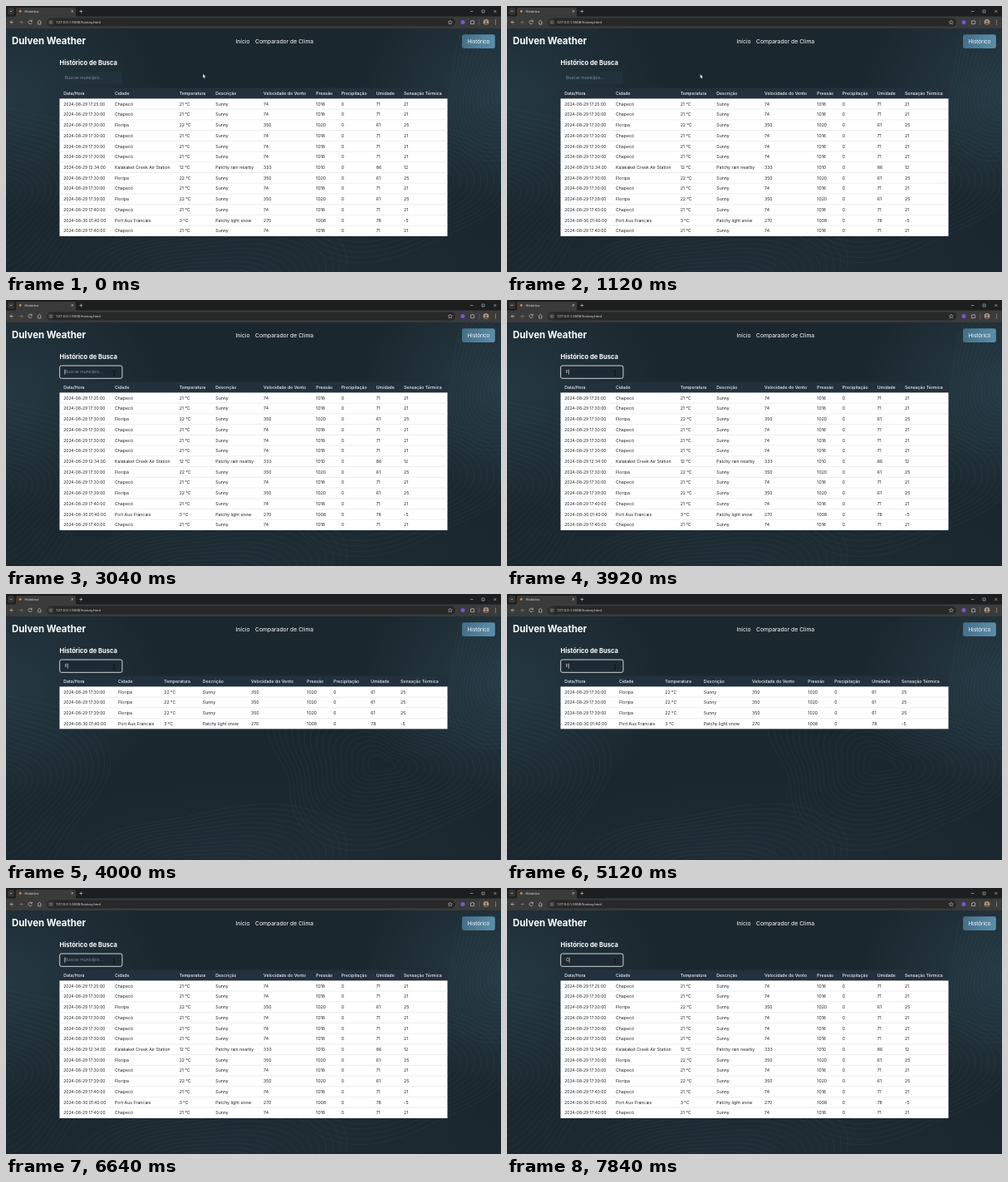
These frames come from a looping animation (596 px wide and 320 px high, 8 s). An HTML page:

```html
<!DOCTYPE html>
<html lang="pt-BR">
<head>
<meta charset="utf-8">
<title>Histórico</title>
<style>
  html, body { margin: 0; width: 100%; height: 100%; overflow: hidden; background: #1b272e; }
  svg { display: block; width: 596px; height: 320px; }
  text { font-family: Inter, "Open Sans", sans-serif; fill: #fff; white-space: pre; }
  .browser text { font-family: Roboto, sans-serif; fill: #dcdcdc; }
  .icon { fill: none; stroke: #c4c4c4; stroke-width: .7; }
  .rows text { font-size: 5.2px; fill: #202326; }
  .rows .date { font-size: 4.95px; }
  .head { font-size: 5.2px; font-weight: 500; fill: #eef2f4; }
</style>
</head>
<body>
<svg id="stage" viewBox="0 0 596 320" xmlns="http://www.w3.org/2000/svg">
  <defs>
    <radialGradient id="glow">
      <stop offset="0" stop-color="#2b4451"/>
      <stop offset="1" stop-color="#2b4451" stop-opacity="0"/>
    </radialGradient>
    <linearGradient id="button">
      <stop offset="0" stop-color="#456f87"/>
      <stop offset="1" stop-color="#5c8eaa"/>
    </linearGradient>
    <clipPath id="page"><path d="M0 27H596V320H0Z"/></clipPath>
  </defs>

  <g clip-path="url(#page)">
    <path d="M0 27H596V320H0Z" fill="#1b272e"/>
    <ellipse cx="0" cy="110" rx="190" ry="150" fill="url(#glow)" opacity=".6"/>
    <ellipse cx="596" cy="105" rx="170" ry="140" fill="url(#glow)" opacity=".7"/>
    <ellipse cx="300" cy="320" rx="330" ry="100" fill="url(#glow)" opacity=".2"/>
    <g id="contours" fill="none" stroke="#4a7280" stroke-width=".5" opacity=".24"/>
  </g>

  <g class="browser">
    <path d="M0 0H596V13H0Z" fill="#1d1e1f"/>
    <path d="M0 12.5H596V27H0Z" fill="#3b3b3b"/>
    <path d="M10 13Q12 13 12 11V4Q12 2 14 2H82Q84 2 84 4V11Q84 13 86 13Z" fill="#3b3b3b"/>
    <rect x="2" y="2" width="8" height="8.5" rx="2.5" fill="#343536"/>
    <circle cx="17.2" cy="6.4" r="1.4" fill="#d98a3c"/>
    <text x="22.5" y="8" font-size="4.2">Histórico</text>
    <rect x="49" y="14.6" width="492" height="10" rx="5" fill="#282828"/>
    <circle cx="54" cy="19.5" r="3.6" fill="#3b3b3b"/>
    <text x="60" y="21.1" font-size="4.4">127.0.0.1:5500/history.html</text>
    <g class="icon">
      <path d="M4.7 5.7L6 7L7.3 5.7M78.4 5L81 7.6M81 5L78.4 7.6M90.3 4.6V8.4M88.4 6.5H92.2"/>
      <path d="M9 19.5H5M7 17.5L5 19.5L7 21.5"/>
      <path d="M16 19.5H20M18 17.5L20 19.5L18 21.5" opacity=".5"/>
      <path d="M31 18.2A2.2 2.2 0 1 0 31.2 20.2M31.2 16.8V18.6H29.4"/>
      <path d="M38 19.3L40.2 17.2L42.4 19.3M38.6 19V22H41.8V19"/>
      <path d="M52.3 18.6H55.6M52.3 20.5H55.6" stroke-width=".5"/>
      <path d="M534.7 17L535.4 18.8L537.3 18.9L535.8 20.1L536.3 22L534.7 20.9L533.1 22L533.6 20.1L532.1 18.9L534 18.8Z" stroke-width=".5"/>
      <path d="M559.5 18H561Q561.7 16 562.4 18H563.6V21.6H559.5Z"/>
      <path d="M569.8 16V23" stroke="#666"/>
      <path d="M559 6.5H562.5M573 5H576V8H573ZM587.3 5L590.3 8M590.3 5L587.3 8" stroke-width=".6"/>
    </g>
    <circle cx="550" cy="19.5" r="2.5" fill="#7656d8"/>
    <circle cx="578" cy="19.4" r="3.3" fill="#b39a86"/>
    <path d="M575.5 21.5Q578 18.5 580.5 21.5Q578 23.8 575.5 21.5Z" fill="#5f5148"/>
    <circle cx="578" cy="18.4" r="1.2" fill="#5f5148"/>
    <path d="M589.5 16.8V22.4" stroke="#c4c4c4" stroke-width="1" stroke-dasharray="1 1.2"/>
  </g>

  <text x="7" y="46.3" font-size="11.4" font-weight="700">Dulven Weather</text>
  <text x="276.5" y="45" font-size="6.8">Início</text>
  <text x="300" y="45" font-size="6.8">Comparador de Clima</text>
  <rect x="549" y="34.3" width="39.8" height="16.6" rx="2.6" fill="url(#button)"/>
  <text x="569" y="45" font-size="6.3" text-anchor="middle">Histórico</text>
  <text x="64.5" y="70.5" font-size="7.6" font-weight="700">Histórico de Busca</text>

  <rect id="field" x="64.7" y="79" width="75.2" height="15.3" rx="2" fill="#22323c"/>
  <text id="query" x="71" y="88.3" font-size="5.1"></text>
  <path id="caret" stroke="#fff" stroke-width=".6"/>
  <g id="tables"></g>

  <path id="arrow" d="M0 0V5.2L1.2 4.1L2 6L3 5.6L2.2 3.8H3.8Z" fill="#fff" stroke="#111" stroke-width=".4"/>
  <path id="beam" d="M-.9 -2.6H.9M0 -2.6V2.6M-.9 2.6H.9" fill="none" stroke="#05090b" stroke-width=".6"/>
</svg>
<script>
const $ = id => document.getElementById(id);
const LOOP = 8000;
const TOP = 111.4, PITCH = 12.73;

function add(parent, tag, attrs, content = '') {
  const el = document.createElementNS('http://www.w3.org/2000/svg', tag);
  for (const key in attrs) el.setAttribute(key, attrs[key]);
  el.textContent = content;
  return parent.appendChild(el);
}

// Background contour lines
function contour(cx, cy, radius, stretch, phase) {
  let d = '';
  for (let k = 0; k <= 72; k++) {
    const a = k * Math.PI / 36;
    const r = radius * (1 + .16 * Math.sin(3 * a + phase) + .09 * Math.cos(2 * a - phase));
    d += (k ? 'L' : 'M') + (cx + stretch * r * Math.cos(a)).toFixed(1) + ' ' + (cy + r * Math.sin(a)).toFixed(1);
  }
  add($('contours'), 'path', { d });
}
for (let i = 0; i < 18; i++) {
  contour(450, 205, 10 + i * 5, 1.5, 1 + i * .05);
  contour(-15, 225, 12 + i * 6, 1.2, 2 + i * .04);
  contour(615, 100, 10 + i * 5, .9, i * .05);
  contour(250, 350, 10 + i * 5, 1.7, 3 + i * .04);
}

// Search history
const titles = ['Data/Hora', 'Cidade', 'Temperatura', 'Descrição', 'Velocidade do Vento',
  'Pressão', 'Precipitação', 'Umidade', 'Sensação Térmica'];
const weather = {
  'Chapecó': ['21 °C', 'Sunny', 74, 1018, 0, 71, 21],
  'Floripa': ['22 °C', 'Sunny', 350, 1020, 0, 61, 25],
  'Kalakaket Creek Air Station': ['12 °C', 'Patchy rain nearby', 333, 1010, 0, 86, 12],
  'Port Aux Francais': ['3 °C', 'Patchy light snow', 270, 1008, 0, 78, -5]
};
const [CH, FL, KA, PO] = Object.keys(weather);
const searches = [['29 17:25', CH], ['29 17:30', CH], ['29 17:30', FL], ['29 17:30', CH],
  ['29 17:30', CH], ['29 17:30', CH], ['29 12:34', KA], ['29 17:30', FL], ['29 17:30', CH],
  ['29 17:39', FL], ['29 17:40', CH], ['30 01:40', PO], ['29 17:40', CH]];

function buildTable(columns, rows) {
  const group = add($('tables'), 'g', { class: 'rows' });
  add(group, 'rect', { x: 64.5, y: 98.4, width: 467, height: 13, fill: '#22313d' });
  add(group, 'rect', { x: 64.5, y: TOP, width: 467, height: rows.length * PITCH, fill: '#fff' });
  titles.forEach((title, i) =>
    add(group, 'text', { x: columns[i], y: 106.8, style: 'fill:#eef2f4;font-weight:500' }, title));
  rows.forEach(([time, city], r) => {
    const y = TOP + r * PITCH;
    if (r) add(group, 'path', { d: `M64.5 ${y}H531.5`, stroke: '#dfe2e4', 'stroke-width': .6 });
    [`2024-08-${time}:00`, city, ...weather[city]].forEach((value, i) =>
      add(group, 'text', { x: columns[i], y: y + 8.2, class: i ? '' : 'date' }, value));
  });
  return group;
}
const fullTable = buildTable([69.3, 131, 208.7, 252.3, 310, 373.3, 403.7, 445.7, 479], searches);
const filteredTable = buildTable([69.3, 135, 190.3, 236.8, 295, 362.3, 394.3, 439.3, 475],
  searches.filter(([, city]) => /f/i.test(city)));

// Timeline
const FOCUS = 2720, TYPE_F = 3920, ERASE = 6560, TYPE_C = 7840, FILTER_DELAY = 80;

function ease(t, from, to) {
  const p = Math.min(1, Math.max(0, (t - from) / (to - from)));
  return p * p * (3 - 2 * p);
}
const show = (el, visible) => el.setAttribute('display', visible ? 'inline' : 'none');

function render(t) {
  const focused = t >= FOCUS;
  const typed = t >= TYPE_C ? 'C' : t >= TYPE_F && t < ERASE ? 'F' : '';
  const filtered = t >= TYPE_F + FILTER_DELAY && t < ERASE + FILTER_DELAY;
  show(fullTable, !filtered);
  show(filteredTable, filtered);

  $('field').setAttribute('stroke', focused ? '#fff' : 'none');
  $('field').setAttribute('stroke-width', .8);
  $('field').setAttribute('fill', focused ? '#1d2a33' : '#22323c');
  const query = $('query');
  query.textContent = typed || 'Buscar município...';
  query.style.fill = typed ? '#fff' : '#82939e';

  const lastEdit = [TYPE_C, ERASE, TYPE_F, FOCUS].find(edit => t >= edit);
  show($('caret'), focused && (t - lastEdit) % 1000 < 500);
  const caretX = typed ? 71.3 + query.getComputedTextLength() : 70.8;
  $('caret').setAttribute('d', `M${caretX} 83.6V89.7`);

  const travel = ease(t, 1000, 1960), settle = ease(t, 2240, 2640);
  const x = 237 - 104 * travel - 3 * settle;
  const y = 81.5 + 8.5 * travel - 2 * settle;
  const inside = x < 140;
  show($('arrow'), !inside);
  show($('beam'), inside);
  for (const id of ['arrow', 'beam']) $(id).setAttribute('transform', `translate(${x} ${y})`);
}

let start;
function tick(now) {
  start ??= now;
  render((now - start) % LOOP);
  requestAnimationFrame(tick);
}
render(0);
requestAnimationFrame(tick);
</script>
</body>
</html>
```
